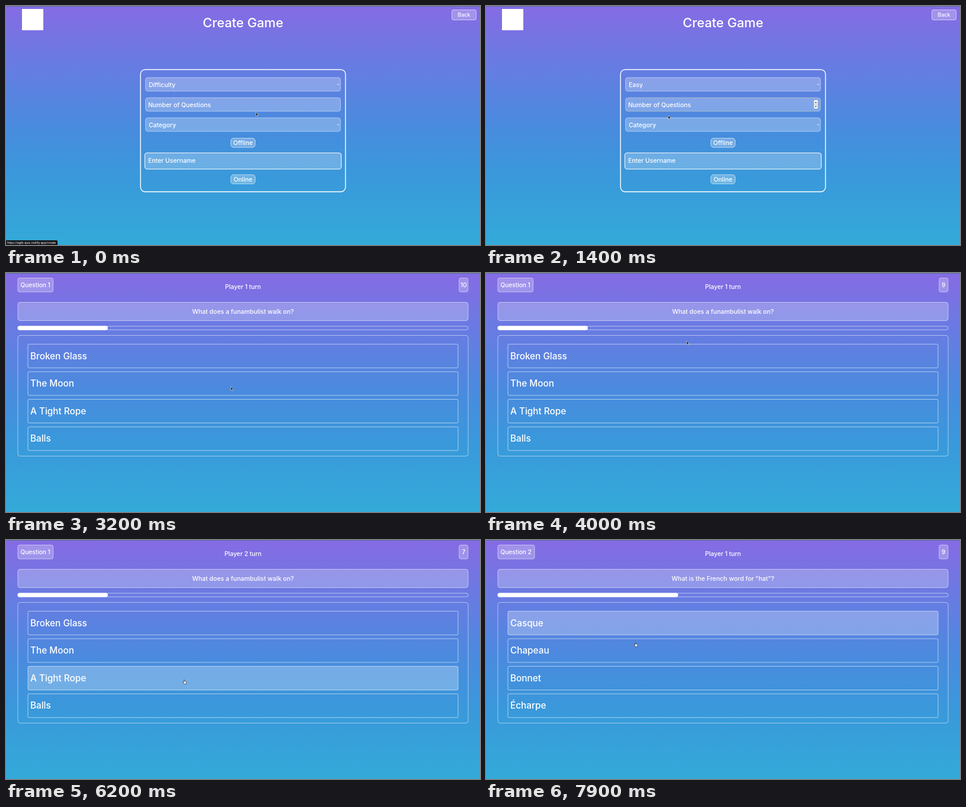
These frames come from a looping animation (800 px wide and 404 px high, 8000 ms). An HTML page:

```html
<!DOCTYPE html>
<html lang="en">
<head>
<meta charset="utf-8">
<title>Trivia quiz</title>
<style>
  html, body { margin: 0; width: 100%; height: 100%; overflow: hidden; background: #33aad8; }
  svg { display: block; width: 800px; height: 404px; font-weight: 500; }
  text { font-family: Inter, "Open Sans", sans-serif; fill: #fff; white-space: pre; }
</style>
</head>
<body>
<svg id="stage" viewBox="0 0 800 404">
  <defs>
    <linearGradient id="sky" x1="0" y1="0" x2="0" y2="1">
      <stop offset="0" stop-color="#866be4"/>
      <stop offset=".25" stop-color="#677ce2"/>
      <stop offset=".5" stop-color="#498bde"/>
      <stop offset=".7" stop-color="#3a98db"/>
      <stop offset="1" stop-color="#33aad8"/>
    </linearGradient>
    <linearGradient id="glass" x1="0" y1="0" x2="0" y2="1">
      <stop offset="0" stop-color="#b3cbe3"/>
      <stop offset="1" stop-color="#8fdde2"/>
    </linearGradient>
  </defs>
  <rect width="800" height="404" fill="url(#sky)"/>
  <rect width="800" height="1" fill="#4f7391"/>
</svg>
<script>
const LOOP = 8000, STEP = 100;
const stage = document.getElementById('stage');

function add(parent, tag, attrs, content) {
  const el = document.createElementNS('http://www.w3.org/2000/svg', tag);
  for (const key in attrs) el.setAttribute(key, attrs[key]);
  if (content !== undefined) el.textContent = content;
  parent.appendChild(el);
  return el;
}
const group = (parent, attrs = {}) => add(parent, 'g', attrs);
const show = (el, on) => el.setAttribute('visibility', on ? 'inherit' : 'hidden');
const setText = (el, s) => { if (el.textContent !== s) el.textContent = s; };
const between = (t, a, b) => t >= a && t < b;

function label(parent, x, y, size, s, anchor = 'start') {
  return add(parent, 'text', { x, y, 'font-size': size, 'text-anchor': anchor }, s);
}
function box(parent, x, y, width, height, rx, fillAlpha, lineAlpha, line = 1) {
  return add(parent, 'rect', {
    x, y, width, height, rx, fill: '#fff', 'fill-opacity': fillAlpha,
    stroke: '#fff', 'stroke-opacity': lineAlpha, 'stroke-width': line
  });
}
function stroke(parent, d, color, width = 1) {
  return add(parent, 'path', { d, fill: 'none', stroke: color, 'stroke-width': width });
}

// Setup page
const setup = group(stage);
add(setup, 'rect', { x: 27, y: 5, width: 36, height: 36, fill: '#fff' });
label(setup, 400, 36, 21.8, 'Create Game', 'middle');
box(setup, 752.5, 6.5, 41, 17, 2.5, .26, .55);
label(setup, 773, 18.3, 8.8, 'Back', 'middle');
box(setup, 227, 107.5, 346, 206.5, 8, 0, 1, 1.4);

function field(row, s, x, arrow) {
  const y = 121 + row * 34;
  const rect = box(setup, 235.5, y, 329, 23, 4, .26, .45);
  if (arrow) stroke(setup, `M559 ${y + 10.7}l1.7 1.7 1.7-1.7`, '#fff', .9);
  return { rect, text: label(setup, x, y + 15.5, 10.4, s) };
}
const difficulty = field(0, 'Difficulty', 241, true);
const count = field(1, 'Number of Questions', 240, false);
const category = field(2, 'Category', 241, true);

box(setup, 234.3, 248.3, 331.5, 27.4, 4, .24, .8, 1.3);
label(setup, 240, 265, 10.4, 'Enter Username');
['Offline', 'Online'].forEach((s, i) => {
  const y = 223.5 + i * 61.7;
  box(setup, 379.5, y, 41, 15.5, 4.5, .25, .6);
  label(setup, 400, y + 11.6, 10.4, s, 'middle');
});

const spinner = group(setup);
add(spinner, 'rect', { x: 553.5, y: 159, width: 6.5, height: 14.5, rx: 1, fill: '#f1f1f1' });
stroke(spinner, 'M553.5 166.2h6.5', '#aaa', .6);
add(spinner, 'path', { d: 'M555.2 164l1.5-2 1.5 2zM555.2 169l1.5 2 1.5-2z', fill: '#333' });

const status = group(setup, { 'font-weight': 400 });
add(status, 'path', { d: 'M0 396h85q2 0 2 2v6H0z', fill: '#17191c' });
label(status, 2, 401.9, 5, 'https://agtk-quiz.netlify.app/create');

// Drop-down menus
function menu(top, height, items, more) {
  const g = group(setup, { 'font-weight': 400 });
  add(g, 'rect', { x: 232, y: top + .8, width: 329.5, height, rx: 3, fill: '#124', opacity: .25 });
  add(g, 'rect', { x: 232.5, y: top, width: 328.5, height, rx: 3, fill: 'url(#glass)' });
  const bar = add(g, 'rect', { x: 234, width: 326, height: 15, rx: 2, fill: '#42a32b' });
  stroke(g, `M236 ${top + 10.2}l1.3 1.8 2.4-4`, '#111', .9);
  const rows = items.map((s, i) => label(g, 242, top + 13.3 + i * 15, 9.2, s));
  if (more) stroke(g, `M394 ${top + 203.5}l2.4 2.2 2.4-2.2`, '#222');
  return (open, y) => {
    const hot = Math.floor((y - top - 2) / 15);
    show(g, open);
    show(bar, open && between(hot, 0, rows.length));
    bar.setAttribute('y', top + 2.5 + hot * 15);
    rows.forEach((row, i) => { row.style.fill = i === hot ? '#fff' : '#111'; });
  };
}
const levelMenu = menu(123, 65, ['Difficulty', 'Easy', 'Medium', 'Hard']);
const topicMenu = menu(192, 210, [
  'Category', 'General Knowledge', 'Books', 'Film', 'Music', 'Musicals & Theatres', 'Television',
  'Video Games', 'Board Games', 'Science & Nature', 'Computers', 'Mathematics', 'Mythology'
], true);

// Quiz page
const quiz = group(stage);
const badge = box(quiz, 20, 8.5, 59.5, 23.5, 3, .25, .5);
const badgeText = label(quiz, 24.5, 24.3, 10.1, '');
box(quiz, 764.8, 8.5, 15, 23.5, 3, .25, .5);
const timer = label(quiz, 772.3, 24.3, 10.1, '', 'middle');
const turn = label(quiz, 400, 27, 10.3, '', 'middle');
box(quiz, 20, 49.5, 760, 31, 4, .24, .5);
const question = label(quiz, 400, 68.7, 10.5, '', 'middle');
box(quiz, 20, 90, 760, 6, 3, 0, .55);
const progress = add(quiz, 'rect', { x: 19.5, y: 89.6, height: 6.8, rx: 3.4, fill: '#fff' });
box(quiz, 20, 105.5, 760, 204, 4, 0, .5);
const optionTop = i => 120.3 + i * 46.6;
const options = [0, 1, 2, 3].map(i => ({
  rect: box(quiz, 37, optionTop(i), 726, 40, 2, 0, .55),
  text: label(quiz, 41, optionTop(i) + 25.2, 15.3, '')
}));

const rounds = [
  { ask: 'What does a funambulist walk on?', answers: ['Broken Glass', 'The Moon', 'A Tight Rope', 'Balls'] },
  { ask: 'What is the French word for "hat"?', answers: ['Casque', 'Chapeau', 'Bonnet', 'Écharpe'] }
];

// Pointer
const arrow = add(stage, 'path', {
  d: 'M0 0v6l1.4-1.2 1 2.1 1-.5-1-2h1.9z', fill: '#111', stroke: '#fff', 'stroke-width': .5
});
const hand = add(stage, 'path', {
  d: 'M0 .6q.7-1 1.3 0v2.2l2.6.6q.8.3.7 1.2l-.5 2.6H.8L-1.4 4.6q0-.9.8-.6l.6.5z',
  fill: '#fff', stroke: '#222', 'stroke-width': .7
});

// Pointer stops: time, x, y
const stops = [
  [0, 421.5, 180], [400, 300, 134], [800, 298, 150], [1100, 308, 167], [1400, 307.5, 185],
  [1700, 288, 201], [2300, 278, 225], [2500, 280, 217], [3000, 400, 231], [3600, 338.5, 115],
  [4000, 338.5, 115], [4300, 355.5, 233], [5300, 355.5, 233], [6200, 300, 236],
  [7200, 169.5, 205.5], [7700, 225, 142], [7900, 251.5, 173]
];
function pointer(t) {
  const i = Math.max(1, stops.findIndex(stop => stop[0] >= t));
  const [t0, x0, y0] = stops[i - 1], [t1, x1, y1] = stops[i];
  const k = (t - t0) / (t1 - t0);
  return [x0 + (x1 - x0) * k, y0 + (y1 - y0) * k];
}

const QUIZ = 3100, PLAYER2 = 4300, ROUND2 = 7600;
const seconds = t => Math.floor((t - 2800) / 850);

function drawSetup(t, y) {
  const active = between(t, 1000, 1800);
  show(status, t < 500);
  setText(difficulty.text, t < 900 ? 'Difficulty' : 'Easy');
  setText(count.text, t < 1600 ? 'Number of Questions' : '5');
  setText(category.text, t < 2600 ? 'Category' : 'General Knowledge');
  count.rect.setAttribute('stroke', active ? '#e9e2b0' : '#fff');
  show(spinner, active);
  levelMenu(between(t, 400, 900), y);
  topicMenu(between(t, 1800, 2600), y);
}

function drawQuiz(t) {
  const index = t >= ROUND2 ? 1 : 0;
  const round = rounds[index];
  const start = index ? ROUND2 : t >= PLAYER2 ? PLAYER2 : QUIZ;
  setText(badgeText, `Question ${index + 1}`);
  badge.setAttribute('width', 59.5 + index * 2.5);
  setText(turn, `Player ${start === PLAYER2 ? 2 : 1} turn`);
  setText(timer, String(10 - seconds(t) + seconds(start)));
  setText(question, round.ask);
  progress.setAttribute('width', 152.4 * (index + 1));

  // Hover trails the pointer by one step.
  const [, y] = pointer(t - STEP);
  let over = false;
  options.forEach((option, i) => {
    const hot = between(y, optionTop(i), optionTop(i) + 40);
    over = over || hot;
    setText(option.text, round.answers[i]);
    option.rect.setAttribute('fill-opacity', hot ? .26 : 0);
  });
  return over;
}

function draw(now) {
  const t = Math.floor((now % LOOP) / STEP) * STEP;
  const [x, y] = pointer(t);
  const playing = t >= QUIZ;
  setup.style.display = playing ? 'none' : '';
  quiz.style.display = playing ? '' : 'none';
  let over = false;
  if (playing) over = drawQuiz(t);
  else drawSetup(t, y);
  for (const [el, on] of [[arrow, !over], [hand, over]]) {
    show(el, on);
    el.setAttribute('transform', `translate(${x} ${y})`);
  }
}

const begin = performance.now();
function frame() {
  draw(performance.now() - begin);
  requestAnimationFrame(frame);
}
frame();
</script>
</body>
</html>
```
